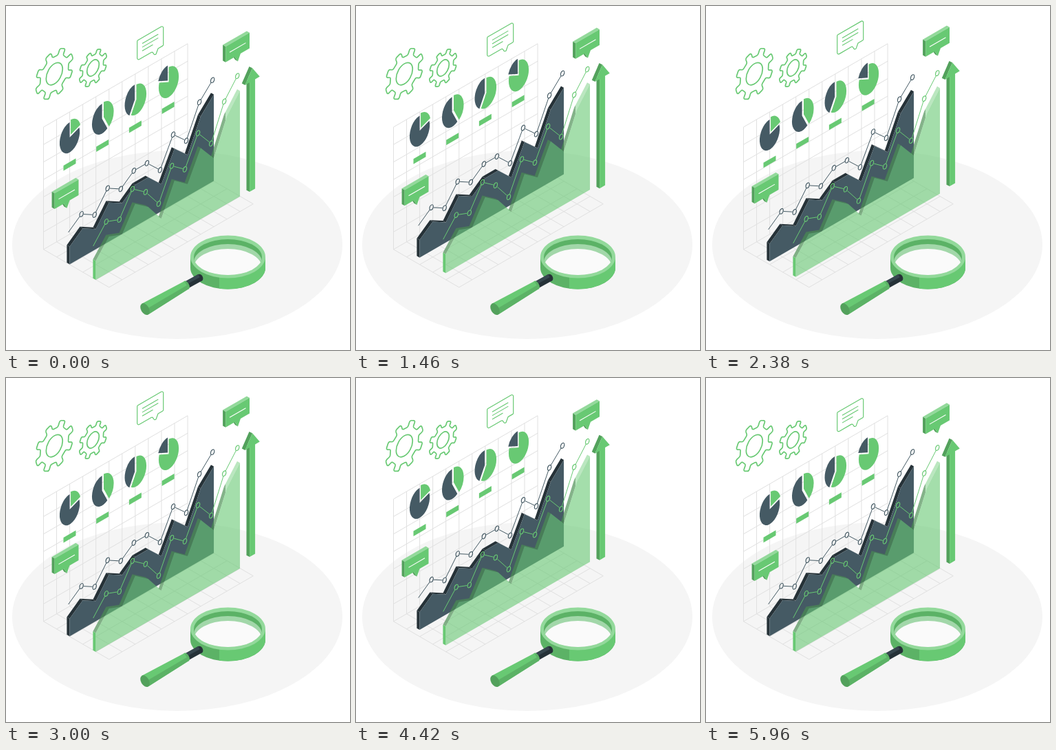
Animation of 500x500 px, one loop 6000 ms. Source, as an HTML page with a canvas:

```html
<!DOCTYPE html>
<html lang="en">
<head>
<meta charset="utf-8">
<title>Growth charts</title>
<style>
html, body { margin: 0; width: 100%; height: 100%; overflow: hidden; background: #fff; }
canvas { display: block; width: 500px; height: 500px; }
</style>
</head>
<body>
<canvas id="stage"></canvas>
<script>
const canvas = document.getElementById('stage');
const ctx = canvas.getContext('2d');
const ratio = Math.max(1, window.devicePixelRatio || 1);
canvas.width = canvas.height = 500 * ratio;

const GREEN = '#68c973', SHADE = '#5cb266', DEEP = '#53a15c', LIGHT = '#93d99b';
const SLATE = '#455a64', INK = '#263238', GRID = '#e0e0e0';
const TILT = 0.5785, CELL = 19.05, COLS = 11, ROWS = 7, DEPTH = 5;
const TAU = Math.PI * 2, DEG = Math.PI / 180;

// Chart values: height above the sloping base line, one per column
const SLATE_DATA = [0, 15.5, 3.5, 31, 19, 34.5, 34.5, 13.5, 54, 34, 79, 100];
const GREEN_DATA = [0, 24.5, 16.5, 50, 34.5, 6.5, 50.5, 34.5, 76, 50, 100, 126];

// Isometric wall: u runs along the slope, v straight down
const wall = (x, y, points) => points.map(([u, v]) => [x + u, y + v - TILT * u]);

function fill(color, points) {
  if (points) {
    ctx.beginPath();
    points.forEach(([x, y]) => ctx.lineTo(x, y));
  }
  ctx.fillStyle = color;
  ctx.fill();
}

function stroke(color, width, points) {
  if (points) {
    ctx.beginPath();
    points.forEach(([x, y]) => ctx.lineTo(x, y));
  }
  ctx.strokeStyle = color;
  ctx.lineWidth = width;
  ctx.stroke();
}

function oval(color, x, y, rx, ry, turn = 0) {
  ctx.beginPath();
  ctx.ellipse(x, y, rx, ry, turn, 0, TAU);
  fill(color);
}

// Builds a path in a sheared unit plane
function onWall(x, y, a, s, build) {
  ctx.save();
  ctx.transform(a, -TILT * a, 0, s, x, y);
  ctx.beginPath();
  build();
  ctx.restore();
}

function shifted(dx, dy, draw) {
  ctx.save();
  ctx.translate(dx, dy);
  draw();
  ctx.restore();
}

function roundLoop(points, radius) {
  const [first, last] = [points[0], points[points.length - 1]];
  ctx.moveTo((last[0] + first[0]) / 2, (last[1] + first[1]) / 2);
  points.forEach((p, i) => ctx.arcTo(...p, ...points[(i + 1) % points.length], radius));
  ctx.closePath();
}

// Clockwise face with the edges that show thickness towards the upper left
function extrude(face, color, side, top, dx = -4.1, dy = -2.3) {
  face.forEach(([ax, ay], i) => {
    const [bx, by] = face[(i + 1) % face.length];
    if ((by - ay) * dx - (bx - ax) * dy <= 0) return;
    const paint = bx > ax + 0.01 ? top : side;
    fill(paint, [[ax, ay], [ax + dx, ay + dy], [bx + dx, by + dy], [bx, by]]);
  });
  fill(color, face);
}

function drawGrid(x, y) {
  const row = 25.4, rise = CELL * TILT, width = COLS * CELL;
  const line = (px, py, points) => stroke(GRID, 1, wall(px, py, points));
  for (let i = 0; i <= COLS; i++) {
    const u = i * CELL;
    line(x, y, [[u, -ROWS * row], [u, 0], [u + DEPTH * CELL, 2 * DEPTH * rise]]);
  }
  for (let j = 0; j <= ROWS; j++) line(x, y - j * row, [[0, 0], [width, 0]]);
  for (let j = 1; j <= DEPTH; j++) line(x + j * CELL, y + j * rise, [[0, 0], [width, 0]]);
}

function drawGear(x, y, a) {
  const points = [];
  for (let k = 0; k < 8; k++) {
    for (const [turn, r] of [[-11.5, 0.75], [-9, 1], [9, 1], [11.5, 0.75]]) {
      const t = (-64 + 45 * k + turn) * DEG;
      points.push([r * Math.cos(t), r * Math.sin(t)]);
    }
  }
  onWall(x, y, a, a * 1.21, () => roundLoop(points, 0.08));
  stroke(GREEN, 1.7);
  onWall(x, y, a * 0.43, a * 0.53, () => ctx.arc(0, 0, 1, 0, TAU));
  stroke(GREEN, 1.7);
}

function slice(color, x, y, from, to) {
  const mid = (from + to) / 2 * DEG, gap = 0.085;
  onWall(x, y, 14.6, 21.8, () => {
    ctx.translate(gap * Math.cos(mid), gap * Math.sin(mid));
    ctx.moveTo(0, 0);
    ctx.arc(0, 0, 1, from * DEG, to * DEG);
    ctx.closePath();
  });
  fill(color);
}

function drawPies() {
  [-17, 58, 122, 199].forEach((split, i) => {
    const x = 93.3 + 47.5 * i, y = 189 - 26.5 * i;
    slice(SLATE, x, y, split, 270);
    slice(GREEN, x, y, -90, split);
    fill(GREEN, wall(83.5 + 47.7 * i, 232 - 27.5 * i, [[0, 0], [18, 0], [18, 7.4], [0, 7.4]]));
  });
}

function drawLine(x, y, data, color) {
  const gap = 3.3, points = wall(x, y, data.map((h, i) => [i * CELL, -h]));
  points.slice(1).forEach(([bx, by], i) => {
    const [ax, ay] = points[i], len = Math.hypot(bx - ax, by - ay);
    const dx = gap * (bx - ax) / len, dy = gap * (by - ay) / len;
    stroke(color, 1, [i ? [ax + dx, ay + dy] : [ax, ay], [bx - dx, by - dy]]);
    onWall(bx, by, 2.7, 3.6, () => ctx.arc(0, 0, 1, 0, TAU));
    stroke(color, 1.1);
  });
}

function drawArea(x, y, base, data, ...paints) {
  const crest = data.map((h, i) => [i * CELL, -base - h]);
  extrude(wall(x, y, [...crest, [COLS * CELL, 0], [0, 0]]), ...paints);
}

function drawCharts() {
  drawArea(92.5, 375.4, 25.7, SLATE_DATA, SLATE, INK, INK);
  drawLine(90.6, 329, SLATE_DATA, SLATE);
  // Thickness catches the light near the summit
  const edge = ctx.createLinearGradient(126.5, 0, 340, 0);
  edge.addColorStop(0.9, 'rgba(73,142,81,.68)');
  edge.addColorStop(0.9, 'rgba(104,201,115,.45)');
  drawArea(130.5, 398, 27.5, GREEN_DATA, 'rgba(104,201,115,.6)', GREEN, edge);
  drawLine(126.7, 349, GREEN_DATA, GREEN);
}

// Speech bubble outline, tail given by its distance from the left
const bubble = (w, h, tail) => [[0, 0], [w, 0], [w, h], [tail + 4, h],
  [tail, h + 9], [tail - 4.3, h], [0, h]];

function drawNote() {
  const x = 190.7, y = 50.3;
  ctx.beginPath();
  roundLoop(wall(x, y, bubble(38, 29, 26.3)), 2);
  stroke(GREEN, 1.2);
  for (let i = 0; i < 3; i++) {
    const v = 8.4 + 5.4 * i;
    stroke(GREEN, 1.1, wall(x, y, [[7.3, v], [i < 2 ? 30.6 : 22.8, v]]));
  }
}

function drawBubble() {
  const x = 319.2, y = 58.9;
  extrude(wall(x, y, bubble(34.8, 22.8, 17.8)), GREEN, DEEP, LIGHT);
  stroke('#fff', 1.1, wall(x, y, [[5.8, 11.7], [29.3, 11.7]]));
}

function drawArrow() {
  const w = 4, head = 10.7, neck = -159;
  extrude(wall(358.1, 267.7, [[-w, 0], [-w, neck], [-head, neck], [0, -177.5],
    [head, neck], [w, neck], [w, 0]]), GREEN, DEEP, DEEP, -4.6);
}

// Bar between two points with half widths r and s, from side lo to side hi
function taper(color, [ax, ay], [bx, by], r, s, lo = -1, hi = 1) {
  const len = Math.hypot(bx - ax, by - ay), nx = (ay - by) / len, ny = (bx - ax) / len;
  const at = (x, y, k) => [x + nx * k, y + ny * k];
  fill(color, [at(ax, ay, r * lo), at(bx, by, s * lo), at(bx, by, s * hi), at(ax, ay, r * hi)]);
}

function drawLens() {
  const x = 322.5, y = 364.5, rx = 54.5;
  for (const [color, left] of [[SHADE, x - rx], [GREEN, 310]]) {
    ctx.save();
    ctx.beginPath();
    ctx.rect(left, y, x + rx - left, 60);
    ctx.clip();
    oval(color, x, y + 16, rx, 31);
    ctx.fillStyle = color;
    ctx.fillRect(x - rx, y, rx * 2, 16);
    ctx.restore();
  }
  oval(LIGHT, x, y, rx, 31);
  oval(SHADE, x, y + 0.5, 49.5, 26);
  ctx.save();
  ctx.clip();
  oval('#a2d7a9', x, y + 8, 49.5, 26.5);
  oval('#fafafa', x, y + 15.5, 49.5, 27);
  ctx.restore();

  const grip = [202, 440.6], joint = [262.5, 405.5], tip = [282, 394.8], turn = -30 * DEG;
  oval(INK, ...tip, 4, 5.4, turn);
  taper(INK, joint, tip, 5.4, 5.4);
  taper('#37474f', joint, tip, 5.4, 5.4, -1, -0.1);
  oval(SHADE, ...joint, 3.5, 6.5, turn);
  taper(GREEN, grip, joint, 9.2, 6.5);
  taper(SHADE, grip, joint, 9.2, 6.5, 0.1);
  oval(DEEP, ...grip, 5.8, 9.2, turn);
}

// Linear rise of 10px and back
const lift = (t, period) => -10 * (1 - Math.abs(1 - 2 * (t % period) / period));

function render(t) {
  const slow = lift(t, 6000), quick = lift(t, 3000);
  ctx.setTransform(ratio, 0, 0, ratio, 0, 0);
  ctx.fillStyle = '#fff';
  ctx.fillRect(0, 0, 500, 500);
  oval('#f5f5f5', 249, 347, 240, 137);
  drawGrid(54.5, 353.8);
  drawGear(70.3, 98.6, 27.8);
  drawGear(126.5, 90, 20.5);
  shifted(0, quick, drawPies);
  shifted(0, quick, drawCharts);
  shifted(0, slow, drawNote);
  shifted(0, slow, drawArrow);
  shifted(0, slow, drawBubble);
  shifted(-248.5, 213.4 + slow, drawBubble);
  drawLens();
}

const begin = performance.now();
function tick(now) {
  render(Math.max(0, now - begin) % 6000);
  requestAnimationFrame(tick);
}
render(0);
requestAnimationFrame(tick);
</script>
</body>
</html>
```
